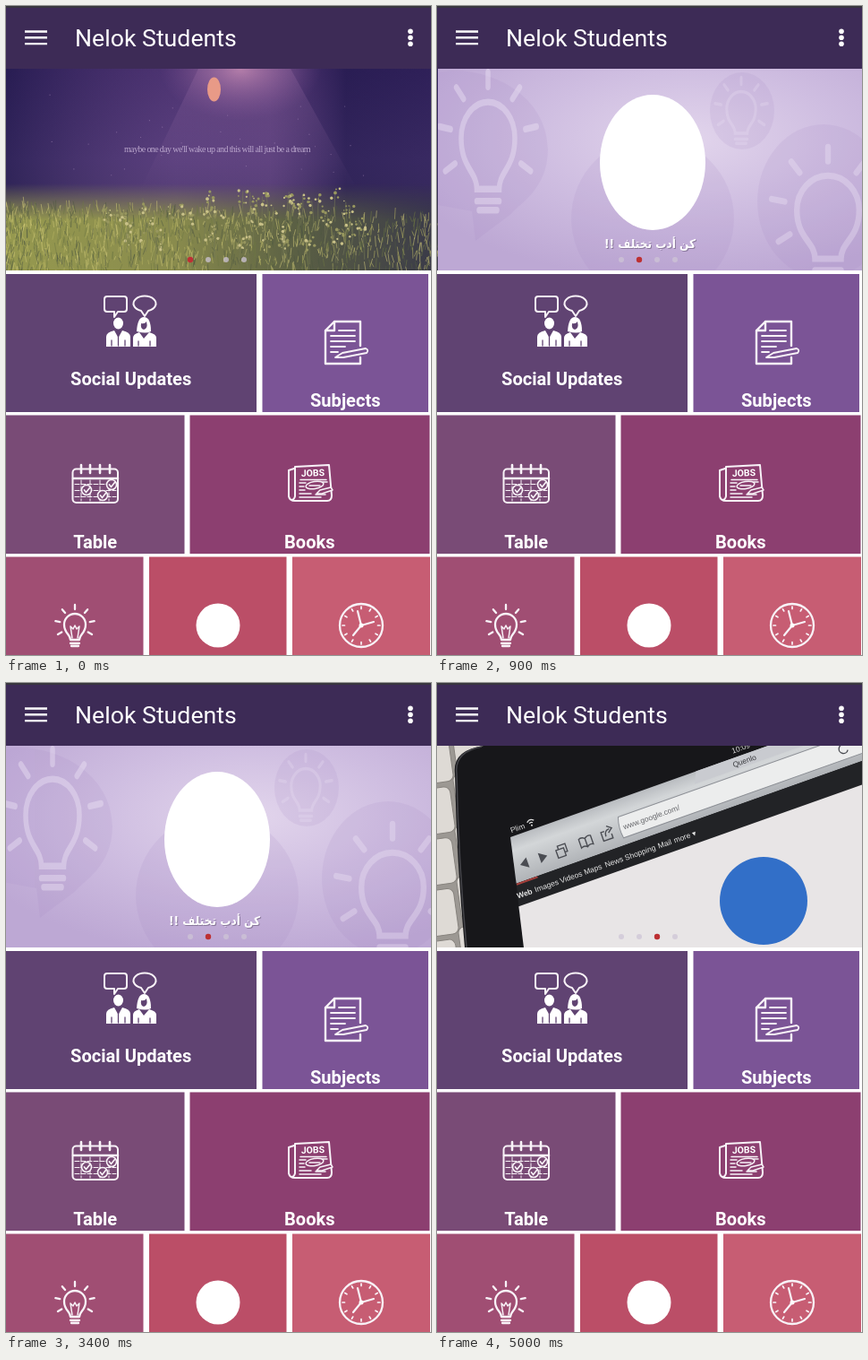
These frames come from a looping animation (475x724 px, 5.1 s). An HTML page:

```html
<!DOCTYPE html>
<html lang="en">
<head>
<meta charset="utf-8">
<title>Nelok Students</title>
<style>
  html, body { margin: 0; width: 100%; height: 100%; overflow: hidden; background: #fff; }
  #stage { display: block; width: 475px; height: 724px; }
  .title { font: 26.7px Roboto, sans-serif; fill: #fff; }
  .label { font: bold 20.1px Roboto, sans-serif; fill: #fff; text-anchor: middle; }
  .quote { font: 10px "Liberation Serif", serif; letter-spacing: -.62px; fill: #b9a5cb; text-anchor: middle; }
  .slogan { font: bold condensed 13.5px "DejaVu Sans", sans-serif; fill: #fff; text-anchor: middle; direction: rtl; }
  .screen { font: 8.5px "Liberation Sans", sans-serif; text-anchor: middle; }
  .icon { fill: none; stroke: #f8f2f7; stroke-width: 2; stroke-linecap: round; stroke-linejoin: round; }
  .solid { fill: #fff; stroke: none; }
</style>
</head>
<body>
<svg id="stage" viewBox="0 0 475 724">
  <defs>
    <linearGradient id="night" y1="0" y2="1" x2="0">
      <stop offset="0" stop-color="#35235f"/><stop offset=".45" stop-color="#493571"/><stop offset=".7" stop-color="#443566"/><stop offset="1" stop-color="#372d50"/>
    </linearGradient>
    <linearGradient id="sides">
      <stop offset="0" stop-color="#1d1748" stop-opacity=".55"/><stop offset=".4" stop-color="#795294" stop-opacity=".35"/>
      <stop offset=".62" stop-color="#78518f" stop-opacity=".4"/><stop offset=".8" stop-color="#20184a" stop-opacity=".55"/><stop offset="1" stop-color="#281d52" stop-opacity=".5"/>
    </linearGradient>
    <radialGradient id="glow">
      <stop offset="0" stop-color="#d092b8" stop-opacity=".75"/><stop offset="1" stop-color="#8b5a9b" stop-opacity="0"/>
    </radialGradient>
    <linearGradient id="beam" x2="0" y2="1">
      <stop offset="0" stop-color="#a577ae" stop-opacity=".25"/><stop offset="1" stop-color="#a577ae" stop-opacity="0"/>
    </linearGradient>
    <linearGradient id="meadow">
      <stop offset="0" stop-color="#96994f"/><stop offset=".4" stop-color="#898b4d"/><stop offset=".68" stop-color="#5b6044"/><stop offset="1" stop-color="#3b3b48"/>
    </linearGradient>
    <linearGradient id="fade" x2="0" y2="1">
      <stop offset="0" stop-color="#000"/><stop offset=".42" stop-color="#fff"/>
    </linearGradient>
    <mask id="horizon"><rect y="198" width="475" height="97" fill="url(#fade)"/></mask>
    <radialGradient id="lilac" cx=".58" cy=".35" r=".7">
      <stop offset="0" stop-color="#e2d5ec"/><stop offset=".5" stop-color="#cfbee1"/><stop offset="1" stop-color="#bda8d4"/>
    </radialGradient>
    <linearGradient id="chrome" x2="0" y2="1">
      <stop offset="0" stop-color="#b9bcc0"/><stop offset=".3" stop-color="#d3d6d8"/><stop offset="1" stop-color="#b0b3b7"/>
    </linearGradient>
    <g id="bulb">
      <path d="M-5 15C-5 9-12 8-12-2A12 12 0 1 1 12-2C12 8 5 9 5 15Z"/>
      <path d="M-5 19H5M-4 22H4"/>
      <path class="rays"/>
    </g>
  </defs>

  <rect width="475" height="70" fill="#3d2b56"/>
  <rect width="475" height="2" fill="#38363e"/>
  <path d="M21 28.500H46M21 35.300H46M21 42.100H46" stroke="#fff" stroke-width="2.400"/>
  <text class="title" x="77" y="45">Nelok Students</text>
  <g fill="#fff"><circle cx="452" cy="28.300" r="2.800"/><circle cx="452" cy="35.300" r="2.800"/><circle cx="452" cy="42.300" r="2.800"/></g>

  <svg y="70" width="475" height="225" viewBox="0 70 475 225">
    <g id="slides">
      <svg y="70" width="475" height="225" viewBox="0 70 475 225">
        <rect y="70" width="475" height="225" fill="url(#night)"/>
        <rect y="70" width="475" height="225" fill="url(#sides)"/>
        <path d="M215 70H300L375 205H150ZM268 70H318L390 200H330Z" fill="url(#beam)"/>
        <ellipse cx="262" cy="70" rx="90" ry="58" fill="url(#glow)"/>
        <rect y="198" width="475" height="97" fill="url(#meadow)" mask="url(#horizon)"/>
        <g id="grass"></g>
        <ellipse cx="232.500" cy="93" rx="7.500" ry="13.500" fill="#e89a87"/>
        <text class="quote" x="236" y="163">maybe one day we'll wake up and this will all just be a dream</text>
      </svg>

      <svg x="475" y="70" width="479" height="225" viewBox="-4 70 479 225">
        <rect x="-4" y="70" width="479" height="225" fill="url(#lilac)"/>
        <g fill="#a487c2" opacity=".14">
          <path d="M-4 74C45 64 118 95 119 160C119 205 85 222 78 232L38 262L34 229L-4 222Z"/>
          <circle cx="236" cy="237" r="91"/>
          <ellipse cx="427" cy="218" rx="74" ry="86"/>
          <ellipse cx="336" cy="117" rx="36" ry="43"/>
        </g>
        <g fill="none" stroke="#eee5f6" stroke-linecap="round" stroke-width="2.200">
          <use href="#bulb" transform="translate(52 154) scale(2.500 3.350)" opacity=".42"/>
          <use href="#bulb" transform="translate(432 234) scale(2.900 3.200)" opacity=".36"/>
          <use href="#bulb" transform="translate(335 118) scale(1.350 1.600)" opacity=".25"/>
        </g>
        <ellipse cx="236" cy="174.500" rx="59" ry="75.500" fill="#fff"/>
        <text class="slogan" x="234" y="271" fill-opacity=".6" style="fill:#665775">كن أدب تختلف !!</text>
        <text class="slogan" x="233" y="269.500">كن أدب تختلف !!</text>
      </svg>

      <svg x="954" y="70" width="475" height="225" viewBox="0 70 475 225">
        <rect y="70" width="475" height="225" fill="#9c9893"/>
        <g id="keys" fill="#dedad5" stroke="#87837e"></g>
        <path d="M52 70Q17 75 20 101Q22 200 31 295H475V70Z" fill="#17171a"/>
        <path d="M50 71Q19 77 22 101Q24 200 33 295" fill="none" stroke="#45454a" stroke-width="1.500"/>
        <g transform="translate(82 172) rotate(-19.500)">
          <path d="M0 0H430V51H-11Z" fill="url(#chrome)"/>
          <path d="M220 0H430V13H214Z" fill="#c9cbd0"/>
          <path d="M-11 51H460V76H-17Z" fill="#222326"/>
          <path d="M-17 76H480V310H-69Z" fill="#e8e5e6"/>
          <path d="M-11 52H14" stroke="#a8403c" stroke-width="2"/>
          <path d="M121 19H430V43H119Q117 31 121 19Z" fill="#eceded" stroke="#8d9096"/>
          <g fill="#4a4c52">
            <path d="M0 33L9 27V39Z"/><path d="M32 33L23 27V39Z"/>
          </g>
          <g fill="none" stroke="#4a4c52" stroke-width="1.400">
            <path d="M46 31V27H55V36H52M46 31H52V40H43V31Z"/>
            <path d="M78 29Q74 26 71 28V38Q75 36 78 39Q81 36 85 38V28Q82 26 78 29V39"/>
            <path d="M101 29H97V39H108V34M101 35Q101 28 107 28M105 24L110 28L105 32"/>
            <path d="M386 27A5 5 0 1 0 388 34"/>
          </g>
          <g class="screen">
            <g fill="#ddd">
              <text x="11" y="-4">Plim</text>
              <text x="276" y="-5">10:09</text>
              <path d="M23-9Q27-13 31-9M25-7Q27-9 29-7" fill="none" stroke="#ddd" stroke-width="1.300"/>
              <circle cx="27" cy="-4.500" r="1"/>
            </g>
            <text x="275" y="10" fill="#38393d">Quenlo</text>
            <text x="156" y="34.500" fill="#65666a">www.google.com/</text>
            <g id="menu" fill="#e8e8e8"></g>
          </g>
        </g>
        <circle cx="365" cy="243" r="49" fill="#326fc8"/>
      </svg>
    </g>
    <g fill="#cdc4d6" fill-opacity=".75">
      <circle cx="206" cy="283" r="3"/><circle cx="226" cy="283" r="3"/><circle cx="246" cy="283" r="3"/><circle cx="266" cy="283" r="3"/>
    </g>
    <circle id="current" cx="206" cy="283" r="3.200" fill="#bd3033"/>
  </svg>

  <rect y="299" width="280" height="154" fill="#604372"/>
  <rect x="286.500" y="299" width="185.500" height="154" fill="#7b5496"/>
  <rect y="456.500" width="199.500" height="154.500" fill="#794b76"/>
  <rect x="205.500" y="456.500" width="268" height="154.500" fill="#8c3f70"/>
  <rect y="614.500" width="153.500" height="110" fill="#a04e73"/>
  <rect x="160" y="614.500" width="153.500" height="110" fill="#bb4e67"/>
  <rect x="320" y="614.500" width="154" height="110" fill="#c75d73"/>
  <text class="label" x="139.700" y="423">Social Updates</text>
  <text class="label" x="379.300" y="447">Subjects</text>
  <text class="label" x="99.700" y="605">Table</text>
  <text class="label" x="339.300" y="605">Books</text>

  <g class="icon">
    <!-- people talking -->
    <path d="M113 324H132Q135 324 135 327V338Q135 341 132 341H125L121 347V341H113Q110 341 110 338V327Q110 324 113 324Z"/>
    <path d="M151 340A12.500 8.500 0 1 1 159 340L155 346Z"/>
    <g class="solid">
      <ellipse cx="125.500" cy="354" rx="5.500" ry="6.500"/>
      <path d="M112 380V369Q112 364 121 362L125.500 370L130 362Q139 364 139 369V380Z"/>
      <path d="M146 363Q147 347 154 347Q162 347 162 363Q157 366 146 363Z"/>
      <path d="M142 380V370Q142 366 149 364L154 371L160 364Q168 366 168 370V380Z"/>
    </g>
    <path d="M125.500 366V379M118 373V379M133 373V379M148 374V379M161 374V379" stroke="#604372" stroke-width="1.300"/>
    <path d="M151 354Q155 355 157 352Q159 360 154 361Q150 360 151 354Z" fill="#604372" stroke="none"/>

    <!-- document and pen -->
    <path d="M396 379V352H367L357 362V399H396V392M367 352V362H357" stroke-width="2.400"/>
    <path d="M372 362H390M363 368H390M363 374H390M363 380H379M363 386H371" stroke-width="1.800"/>
    <path d="M368 392L376 387L402 382Q406 384 403 387L377 392Z" fill="#7b5496" stroke-width="1.800"/>

    <!-- calendar -->
    <rect x="74.500" y="516.500" width="50.500" height="37.500" rx="4"/>
    <path d="M75 527H125M84 512V521M94 512V521M105 512V521M116 512V521" stroke-width="2.600"/>
    <path d="M77 533.500H123M77 540.500H123M77 547.500H123M84 529V552M94 529V552M105 529V552M115 529V552" stroke-width="1" stroke-dasharray="5 2"/>
    <g id="checks"></g>

    <!-- newspaper -->
    <path d="M322 516L316 518V547Q317 552 323 552H359Q364 552 364 546L361 512L323 514V547Q322 551 319 551"/>
    <path d="M329 528.500H358M328 532H335M328 536H333M328 540H334M328 544H341M328 548H352M354 531H359M346 545H357" stroke-width="1.500"/>
    <ellipse cx="345" cy="534.500" rx="10" ry="4" transform="rotate(-9 345 534.500)" stroke-width="1.500"/>
    <path d="M339 535H351" stroke-width="1.400"/>
    <path d="M347 544L351 540L363 537L365 540L353 544Z" fill="#8c3f70" stroke-width="1.500"/>
    <text class="solid" x="343" y="524.500" text-anchor="middle" transform="rotate(-2 343 524)" style="font:bold 10.500px Roboto,sans-serif">JOBS</text>

    <!-- bulb -->
    <use href="#bulb" transform="translate(77 692)" stroke-width="2.300"/>
    <path d="M74 705L72 692L75 695L77 691L79 695L82 692L80 705" stroke-width="1.500"/>

    <circle class="solid" cx="237" cy="691" r="24.500"/>

    <!-- clock -->
    <circle cx="397" cy="691" r="24" stroke-width="2.300"/>
    <path id="ticks" stroke-width="1.700"/>
    <path d="M393 675L397 691L411 687M397 691L388 702" stroke-width="2.200"/>
    <circle class="solid" cx="397" cy="691" r="2.500"/>
  </g>
</svg>

<script>
const $ = id => document.getElementById(id);

function add(parent, tag, attrs, text = '') {
  const el = document.createElementNS(parent.namespaceURI, tag);
  for (const name in attrs) el.setAttribute(name, attrs[name]);
  el.textContent = text;
  return parent.appendChild(el);
}

let seed = 41;
const random = (min, max) => {
  seed = (seed * 16807) % 2147483647;
  return min + (max - min) * seed / 2147483647;
};

// Radial strokes around a centre, angles in degrees.
function spokes(cx, cy, inner, outer, from, step, count) {
  let d = '';
  for (let i = 0; i < count; i++) {
    const a = (from + i * step) * Math.PI / 180;
    const x = Math.cos(a), y = Math.sin(a);
    d += `M${cx + x * inner} ${cy + y * inner}L${cx + x * outer} ${cy + y * outer}`;
  }
  return d;
}
document.querySelector('.rays').setAttribute('d', spokes(0, -2, 17, 22, -210, 40, 7));
$('ticks').setAttribute('d', spokes(397, 691, 18.5, 21, 0, 30, 12));

// Blades thin out and darken towards the right.
const blades = ['#b8b564', '#d0c979', '#6f7844', '#4f5941'];
for (const stroke of blades) {
  let d = '';
  for (let i = 0; i < 330; i++) {
    const x = 475 * random(0, 1) ** 1.4, y = random(224 + x * .03, 300);
    d += `M${x} ${y}l${random(-3, 3)} ${-random(4, 13)}`;
  }
  add($('grass'), 'path', { d, stroke, 'stroke-width': .9, opacity: .6, fill: 'none' });
}
for (let i = 0; i < 62; i++) {
  const x = random(105, 400), top = random(205, 262);
  add($('grass'), 'path', { d: `M${x} ${top}q${random(-3, 3)} 14 ${random(-4, 4)} 34`, stroke: '#777b55', 'stroke-width': .8, opacity: .7, fill: 'none' });
  for (let k = 0; k < 5; k++) {
    add($('grass'), 'circle', { cx: x + random(-5, 5), cy: top + random(-3, 14), r: random(.7, 1.9), fill: k % 2 ? '#c9c188' : '#98975f' });
  }
}
for (let i = 0; i < 30; i++) {
  add($('grass'), 'circle', { cx: random(20, 400), cy: random(80, 200), r: .6, fill: '#b596c4', opacity: .5 });
}

for (let row = 0; row < 5; row++) {
  const y = 60 + row * 57;
  add($('keys'), 'rect', { x: -38 + row * 2, y, width: 50, height: 51, rx: 7, transform: `rotate(-8 0 ${y})` });
  add($('keys'), 'rect', { x: 17 + row * 2, y: y - 12, width: 50, height: 51, rx: 7, transform: `rotate(-8 0 ${y})` });
}

const menu = { Web: -6, Images: 20, Videos: 49, Maps: 75, News: 100, Shopping: 131, Mail: 160, 'more ▾': 184 };
for (const word in menu) {
  add($('menu'), 'text', { x: menu[word], y: 67.5, 'font-size': 8.5, 'font-weight': word === 'Web' ? 700 : 400 }, word);
}

for (const [x, y] of [[118, 534], [90, 540], [108, 546]]) {
  add($('checks'), 'circle', { cx: x, cy: y, r: 5.5, fill: '#794b76', 'stroke-width': 1.6 });
  add($('checks'), 'path', { d: `M${x - 2.5} ${y}l2 2.5l4 -5`, 'stroke-width': 1.7 });
}

// Plays [time, x] steps, each position held until the next.
const LOOP = 5100;
function play(el, steps) {
  const frames = [...steps, [LOOP, steps.at(-1)[1]]].map(([time, x]) => ({
    offset: time / LOOP, transform: `translateX(${x}px)`, easing: 'steps(1, end)'
  }));
  el.animate(frames, { duration: LOOP, iterations: Infinity });
}
play($('slides'), [
  [0, 0], [200, -35], [400, -160], [600, -320], [700, -391], [900, -474], [1000, -479],
  [3600, -700], [3700, -890], [3800, -954]
]);
play($('current'), [[0, 0], [200, 20], [3600, 40]]);
</script>
</body>
</html>
```
